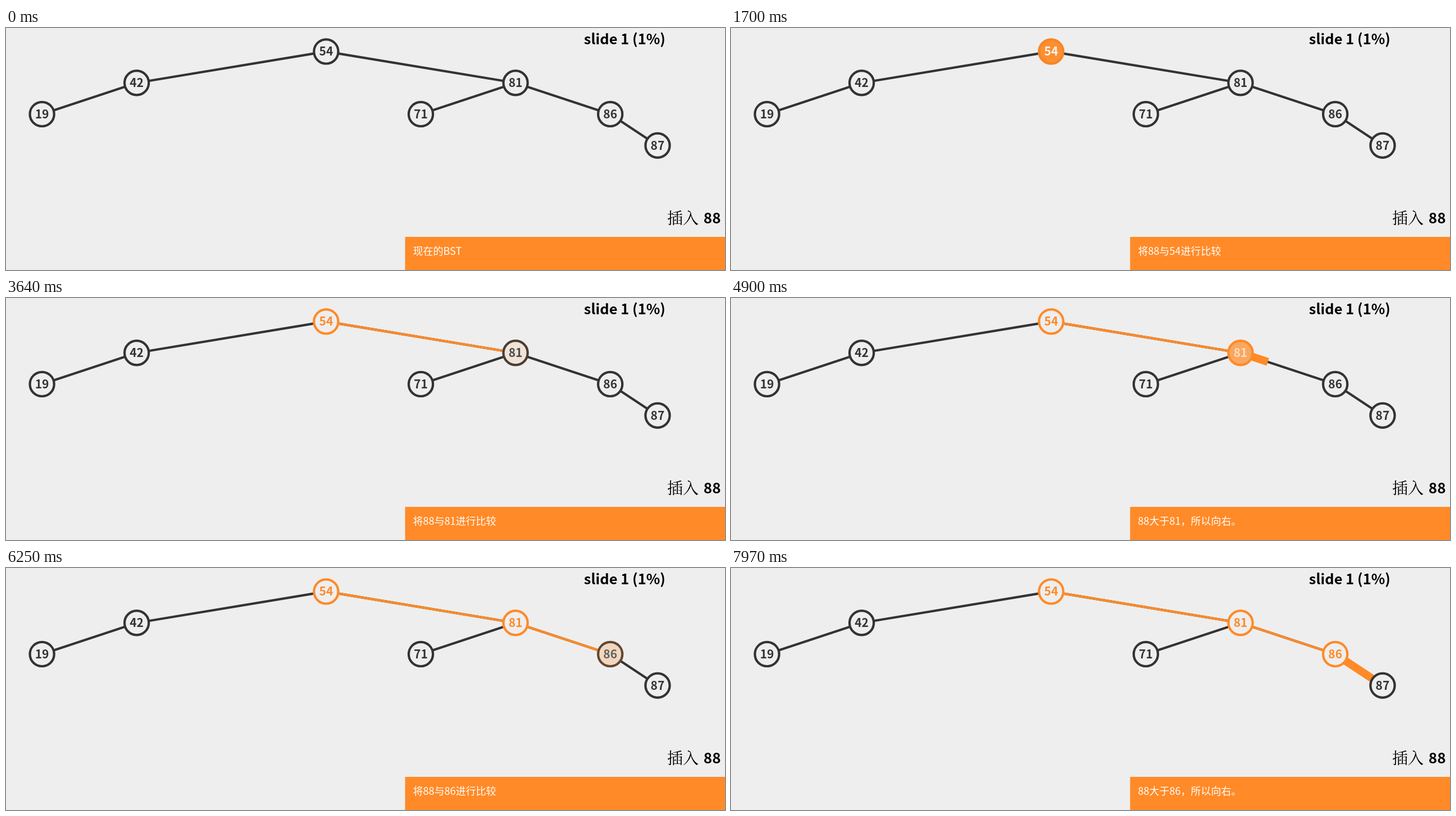
Animation, 1280 px wide and 431 px high, one loop 8000 ms. Source, as an HTML page with a canvas:

```html
<!DOCTYPE html>
<html lang="zh-CN">
<head>
<meta charset="utf-8">
<title>BST insert</title>
<style>
  html, body { margin: 0; width: 100%; height: 100%; overflow: hidden; background: #eee; }
  canvas { display: block; }
</style>
</head>
<body>
<canvas id="stage" width="1280" height="431"></canvas>
<script>
const ctx = document.getElementById('stage').getContext('2d');
const LOOP = 8000;
const MOVE = 1000;
const THIN_TIME = 280;
const THIN = 4.2, THICK = 14;
const DARK = [51, 51, 51], ORANGE = [255, 138, 39], PAPER = [238, 238, 238], WHITE = [255, 255, 255];
const SANS = '"Noto Sans CJK SC", "Noto Sans CJK", "Noto Sans", sans-serif';
const SONG = '"Noto Serif CJK SC", "Noto Sans CJK SC", "Noto Sans CJK", serif';

// Tree nodes: value -> position
const nodes = {
  54: [569.9, 41.9], 42: [232.6, 97.7], 81: [907.1, 97.7], 19: [64.1, 153.4],
  71: [738.5, 153.4], 86: [1075.7, 153.4], 87: [1160, 209.2]
};
const edges = [[54, 42], [42, 19], [54, 81], [81, 71], [81, 86], [86, 87]];

// Each visit fills a node, then grows the edge to its right child.
const visits = [
  { from: 54, to: 81, fill: 930, grow: 2115, thin: 3200 },
  { from: 81, to: 86, fill: 3335, grow: 4485, thin: 5670 },
  { from: 86, to: 87, fill: 5865, grow: 6970, thin: Infinity }
];

const captions = [
  [0, '现在的BST'],
  [790, '将88与54进行比较'], [2050, '88大于54，所以向右。'],
  [3290, '将88与81进行比较'], [4480, '88大于81，所以向右。'],
  [5810, '将88与86进行比较'], [6990, '88大于86，所以向右。']
];

const clamp = x => Math.min(1, Math.max(0, x));
const cubic = x => x < 0.5 ? 4 * x ** 3 : 1 - 4 * (1 - x) ** 3;
const progress = (t, start) => cubic(clamp((t - start) / MOVE));
const mix = (a, b, k) => a.map((v, i) => v + (b[i] - v) * k);
const css = c => `rgb(${c.map(Math.round).join(',')})`;

function line([x1, y1], [x2, y2], k, color, width) {
  ctx.strokeStyle = css(color);
  ctx.lineWidth = width;
  ctx.beginPath();
  ctx.moveTo(x1, y1);
  ctx.lineTo(x1 + (x2 - x1) * k, y1 + (y2 - y1) * k);
  ctx.stroke();
}

function text(str, x, y, font, color, align = 'left') {
  ctx.font = font;
  ctx.fillStyle = color;
  ctx.textAlign = align;
  ctx.fillText(str, x, y);
}

function drawNode(value, t) {
  const [x, y] = nodes[value];
  const visit = visits.find(v => v.from === +value);
  let ring = DARK, fill = PAPER, label = DARK;
  if (visit) {
    const enter = progress(t, visit.fill);
    const leave = progress(t, visit.grow);
    ring = mix(DARK, ORANGE, enter);
    fill = mix(mix(PAPER, ORANGE, enter), PAPER, leave);
    label = mix(mix(DARK, WHITE, enter), ORANGE, leave);
  }
  ctx.beginPath();
  ctx.arc(x, y, 21.6, 0, Math.PI * 2);
  ctx.fillStyle = css(fill);
  ctx.fill();
  ctx.strokeStyle = css(ring);
  ctx.lineWidth = 4.2;
  ctx.stroke();
  text(value, x, y + 7.4, `bold 21px ${SANS}`, css(label), 'center');
}

function draw(t) {
  ctx.fillStyle = css(PAPER);
  ctx.fillRect(0, 0, 1280, 431);

  for (const [a, b] of edges) line(nodes[a], nodes[b], 1, DARK, THIN);
  for (const v of visits) {
    const k = progress(t, v.grow);
    if (k === 0) continue;
    const width = THICK + (THIN - THICK) * clamp((t - v.thin) / THIN_TIME);
    line(nodes[v.from], nodes[v.to], k, ORANGE, width);
  }
  for (const value in nodes) drawNode(value, t);

  text('slide 1 (1%)', 1174, 28.5, `bold 25.5px ${SANS}`, '#000', 'right');
  text('插入', 1177, 349, `300 28px ${SONG}`, '#000');
  text('88', 1272.5, 348, `bold 26px ${SANS}`, '#000', 'right');

  ctx.fillStyle = css(ORANGE);
  ctx.fillRect(710.5, 372, 569.5, 59);
  const caption = captions.filter(c => c[0] <= t).pop()[1];
  text(caption, 724.5, 404, `300 18px ${SANS}`, '#fff');
}

const begin = performance.now();
function tick() {
  draw((performance.now() - begin) % LOOP);
  requestAnimationFrame(tick);
}
tick();
</script>
</body>
</html>
```
